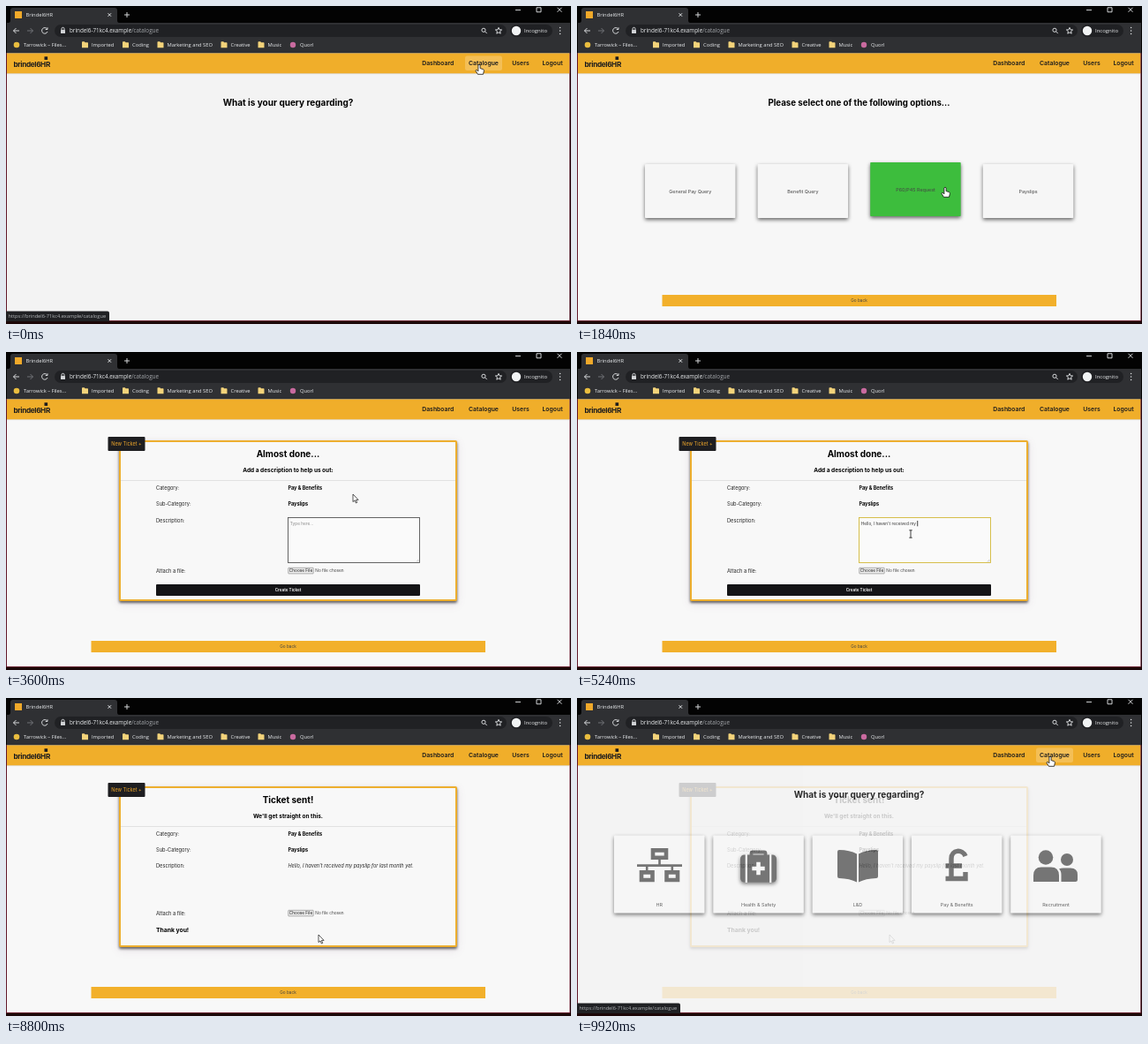
Write an HTML page that moves like this. It is 640 by 360 pixels and loops after 9.96 s.

```html
<!DOCTYPE html>
<html lang="en">
<head>
<meta charset="utf-8">
<title>Ticket walkthrough</title>
<style>
html, body { margin: 0; width: 100%; height: 100%; overflow: hidden; background: #000; }
svg { display: block; width: 100vw; height: 100vh; font-family: Inter, sans-serif; }
text { fill: #222; white-space: pre; }
.ui text { font-family: "Open Sans", "Noto Sans", sans-serif; font-size: 5.8px; fill: #eceef0; }
.ui .dim { fill: #a4a7ab; }
.line { fill: none; stroke: #e8eaed; stroke-width: .9; }
.nav text { font-size: 6.85px; font-weight: 600; fill: #1b1b1d; }
.mid { text-anchor: middle; }
.h1 { font-size: 10px; font-weight: 700; fill: #000; }
.h2 { font-size: 6.5px; font-weight: 700; fill: #000; }
.label { font-size: 5.7px; }
.value { font-size: 5.5px; font-weight: 700; fill: #000; }
.small { font-size: 4.75px; fill: #444; }
.cardText { font-size: 5.4px; fill: #444; text-anchor: middle; }
.card { fill: #f6f6f6; color: #5a5a5a; }
.card > rect { filter: drop-shadow(0 2.2px 2.2px rgba(0,0,0,.6)); }
.panel { fill: #f8f8f8; stroke: #edae2e; stroke-width: 2;
  filter: drop-shadow(0 2px 1.5px rgba(0,0,0,.6)) drop-shadow(0 2px 5px rgba(90,40,90,.12)); }

.anim, .pay, .pay > rect, .p60, .slip { animation: 9960ms linear infinite; }
#cards { animation-name: cards; }
#options { animation-name: options; }
#form { animation-name: form; }
#sent { animation-name: sent; }
#status { animation-name: status; }
#glow { animation-name: glow; }
#navHand { animation-name: navHand; }
.pay { animation-name: pay; }
.pay > rect { animation-name: payShadow; }
.p60 { animation-name: p60; }
.slip { animation-name: slip; }
#area { animation-name: focus; animation-timing-function: step-end; }
#pointer { animation-name: pointer; animation-timing-function: ease-in-out; }
#hand { animation-name: hand; animation-timing-function: step-end; }
#arrow { animation-name: arrow; animation-timing-function: step-end; }
#beam { animation-name: beam; animation-timing-function: step-end; }

@keyframes cards { 0%, .3% { opacity: 0 } 4%, 100% { opacity: 1 } }
@keyframes options { 0%, 14.46% { opacity: 0 } 17.27%, 40% { opacity: 1 } 40.01%, 100% { opacity: 0 } }
@keyframes form { 0%, 28.9% { opacity: 0 } 32.1%, 89% { opacity: 1 } 89.01%, 100% { opacity: 0 } }
@keyframes sent { 0%, 84.74% { opacity: 0 } 88.3%, 97.19% { opacity: 1 } 99.6% { opacity: .18 } 100% { opacity: 0 } }
@keyframes status { 0%, 5% { opacity: 1 } 8.6%, 97.19% { opacity: 0 } 99.6%, 100% { opacity: 1 } }
@keyframes glow { 0%, 3.6% { opacity: 1 } 4.8%, 97.19% { opacity: 0 } 99.6%, 100% { opacity: 1 } }
@keyframes navHand { 0%, 97.19% { opacity: 0 } 99.6%, 100% { opacity: 1 } }
@keyframes pay {
  0%, 6.43% { fill: #f6f6f6; color: #5a5a5a; transform: none }
  8.03%, 20% { fill: #3dbd3d; color: #111; transform: translateY(-2px) }
  20.01%, 100% { fill: #f6f6f6; color: #5a5a5a; transform: none }
}
@keyframes payShadow {
  0%, 6.43% { filter: drop-shadow(0 2.2px 2.2px rgba(0,0,0,.6)) }
  8.03%, 20% { filter: drop-shadow(0 3.2px 2.2px rgba(30,150,30,.9)) }
  20.01%, 100% { filter: drop-shadow(0 2.2px 2.2px rgba(0,0,0,.6)) }
}
@keyframes p60 {
  0%, 15.6% { fill: #f6f6f6; transform: none }
  18.1%, 24.6% { fill: #3dbd3d; transform: translateY(-2px) }
  26.6%, 100% { fill: #f6f6f6; transform: none }
}
@keyframes slip {
  0%, 25.3% { fill: #f6f6f6; transform: none }
  27.4%, 40% { fill: #3dbd3d; transform: translateY(-2px) }
  40.01%, 100% { fill: #f6f6f6; transform: none }
}
@keyframes focus { 0% { stroke: #555 } 42.97% { stroke: #d3b93a } 100% { stroke: #555 } }
@keyframes pointer {
  0%, 2.6% { transform: translate(536px, 66px) }
  7.3%, 14.46% { transform: translate(415.5px, 207px) }
  18%, 23.29% { transform: translate(417px, 205px) }
  27.1%, 29.1% { transform: translate(506px, 204px) }
  32.9%, 39.36% { transform: translate(393px, 161px) }
  43%, 73.5% { transform: translate(378px, 206px) }
  81.5%, 82.3% { transform: translate(356px, 262px) }
  84.3%, 100% { transform: translate(354px, 268px) }
}
@keyframes hand { 0% { opacity: 1 } 30.1% { opacity: 0 } 83% { opacity: 1 } 85% { opacity: 0 } 100% { opacity: 0 } }
@keyframes arrow {
  0% { opacity: 0 } 30.1% { opacity: 1 } 41.3% { opacity: 0 } 78.5% { opacity: 1 } 83% { opacity: 0 } 85% { opacity: 1 }
  97.19% { opacity: 1; animation-timing-function: linear } 99.6% { opacity: .15; animation-timing-function: linear } 100% { opacity: 0 }
}
@keyframes beam { 0% { opacity: 0 } 41.3% { opacity: 1 } 78.5% { opacity: 0 } 100% { opacity: 0 } }
</style>
</head>
<body>
<svg viewBox="0 0 640 360" preserveAspectRatio="none">
  <defs>
    <path id="handShape" d="M-1.1.9Q0-.7 1.1.9V4.6L4.4 5.6Q5.6 6 5.4 7.6L4.5 11.3H-1.6L-4 7.3Q-3.6 5.7-2.4 6.7L-1.1 7.8Z" fill="#fff" stroke="#111" stroke-width=".8"/>
    <path id="folder" d="M0 .6Q0 0 .6 0H2.8L3.6 1H6.4Q7 1 7 1.6V7H0Z" fill="#f3d37a"/>
  </defs>

  <rect width="640" height="360" fill="#030303"/>
  <rect y="356" width="640" height="4" fill="#1b0708"/>

  <!-- Browser frame -->
  <g class="ui">
    <path d="M3 19Q5 19 5 16V5Q5 2 8 2H123Q126 2 126 5V16Q126 19 128 19H639V53.5H1V19Z" fill="#2f3033"/>
    <rect x="10" y="6" width="8" height="8" fill="#f0a92a"/>
    <text x="22.5" y="12.1">Brindel6HR</text>
    <path class="line" d="M115.5 8.2l3.6 3.6m0-3.6l-3.6 3.6M134 10h6M137 7v6"/>
    <path class="line" d="M577 4.6h6M601 1.8h5v5h-5zM624.5 1.8l5 5m0-5l-5 5"/>
    <path class="line" d="M15 28H8.5m3-3l-3 3 3 3M46.6 26a3.3 3.3 0 1 0 .4 3M47 24.3v2.2h-2.3"/>
    <path class="line" d="M24 28h6.5m-3-3l3 3-3 3" style="stroke:#77797d"/>
    <rect x="55" y="21" width="512" height="14" rx="7" fill="#202124"/>
    <rect x="62" y="27" width="5" height="4" rx=".5" fill="#d0d2d5"/>
    <path class="line" d="M63 27v-1.2a1.5 1.5 0 0 1 3 0V27"/>
    <text x="72" y="30.2" style="font-size:6.3px">brindel6-71kc4.example<tspan class="dim">/catalogue</tspan></text>
    <circle class="line" cx="541" cy="27.3" r="2.1"/>
    <path class="line" d="M542.6 28.9l2.2 2.2M558 24.4l1 2.4 2.6.2-2 1.7.6 2.5-2.2-1.3-2.2 1.3.6-2.5-2-1.7 2.6-.2z"/>
    <rect x="571" y="21" width="48" height="14" rx="7" fill="#202124"/>
    <circle cx="578" cy="28" r="5.2" fill="#f1f3f4"/>
    <text x="587" y="30.1" style="font-size:6px">Incognito</text>
    <path d="M627.6 24.5v.1M627.6 28v.1M627.6 31.5v.1" stroke="#e4e6e8" stroke-width="1.5" stroke-linecap="round"/>
    <g id="bookmarks"></g>
  </g>

  <!-- Category page -->
  <rect x="1" y="53.5" width="637.5" height="302.5" fill="#f3f3f3"/>
  <text class="h1 mid" x="319.5" y="113.2">What is your query regarding?</text>
  <g id="cards" class="anim"></g>

  <g id="options" class="anim">
    <rect x="1" y="76" width="637.5" height="280" fill="#f7f7f7"/>
    <text class="h1 mid" x="319.5" y="113.2" style="font-size:9.7px">Please select one of the following options...</text>
    <g id="choices"></g>
  </g>

  <g id="form" class="anim">
    <g class="ticket"></g>
    <text class="h1 mid" x="319.5" y="118.5">Almost done...</text>
    <text class="h2 mid" x="319.5" y="136">Add a description to help us out:</text>
    <g id="formRows"></g>
    <rect id="area" class="anim" x="319.5" y="187.5" width="149" height="51" fill="#fafafa" stroke="#555" stroke-width=".9"/>
    <path d="M464.8 237.5l2.7-2.7m-1.2 2.7l1.2-1.2" stroke="#888" stroke-width=".4"/>
    <text id="typed" class="small" x="321.8" y="196"></text>
    <path id="caret" d="M0 191v6.3" stroke="#111" stroke-width=".8"/>
    <rect x="170" y="263" width="299" height="13" rx="1" fill="#141416"/>
    <text class="mid" x="319.5" y="271.2" style="font-size:4.6px;font-weight:600;fill:#fff">Create Ticket</text>
  </g>

  <g id="sent" class="anim">
    <g class="ticket"></g>
    <text class="h1 mid" x="319.5" y="118.5">Ticket sent!</text>
    <text class="h2 mid" x="319.5" y="136">We'll get straight on this.</text>
    <g id="sentRows"></g>
    <text x="319.5" y="191.9" font-style="italic" font-size="5.55">Hello, I haven't received my payslip for last month yet.</text>
    <text class="h2" x="170" y="264.8" style="font-size:6.8px">Thank you!</text>
  </g>

  <!-- Site header -->
  <g class="nav">
    <rect x="1" y="53.5" width="637.5" height="22.8" fill="#f0ae2a"/>
    <path d="M1 76.7h637.5" stroke="#000" stroke-opacity=".12" stroke-width=".8"/>
    <rect id="glow" class="anim" x="520" y="56.5" width="42" height="16.5" rx="2.5" fill="#f4bf56"/>
    <text x="8.5" y="68.6" style="font-size:8.2px;font-weight:700;letter-spacing:-.35px">brindel6HR</text>
    <rect x="43.5" y="57.3" width="3.6" height="3.6" fill="#1b1b1d"/>
    <g class="mid">
      <text x="489.3" y="66.7">Dashboard</text>
      <text x="541" y="66.7">Catalogue</text>
      <text x="583" y="66.7">Users</text>
      <text x="619" y="66.7">Logout</text>
    </g>
  </g>
  <path d="M.5 53V356.4H638.9V53" fill="none" stroke="#7c1f35" stroke-width=".8"/>

  <g id="status" class="anim ui">
    <path d="M0 345.5H115Q117 345.5 117 347.5V357H0Z" fill="#202124"/>
    <text x="2.5" y="353.2" style="font-size:5.7px;fill:#b4b7ba">https://brindel6-71kc4.example/catalogue</text>
  </g>

  <g id="navHand" class="anim"><use href="#handShape" x="536" y="66"/></g>
  <g id="pointer" class="anim">
    <use id="hand" class="anim" href="#handShape"/>
    <path id="arrow" class="anim" d="M0 0V8.6L2 6.9 3.4 10 4.7 9.4 3.4 6.4H6.1Z" fill="#fff" stroke="#111" stroke-width=".7"/>
    <path id="beam" class="anim" d="M-1.7-4.2H1.7M0-4.2V4.2M-1.7 4.2H1.7" stroke="#111" stroke-width=".8"/>
  </g>
</svg>
<script>
const LOOP = 9960;
const $ = id => document.getElementById(id);

const icons = {
  tree: `<path d="M86 172.4h15v8.4H86zM73 197.4h12.500v8.600H73zM101.500 197.400h12.500v8.600h-12.500z" fill="none" stroke="currentColor" stroke-width="4.600"/>
    <path d="M68 189.600h51M93.500 182v8M79.200 190v6M107.800 190v6" stroke="currentColor" stroke-width="2.600"/>`,
  kit: `<rect x="185" y="177.500" width="41" height="31" rx="4.500" fill="currentColor"/>
    <path d="M197.500 179v-3q0-1.500 1.500-1.500h13q1.500 0 1.500 1.500v3" fill="none" stroke="currentColor" stroke-width="3.800"/>
    <path d="M191.800 177v32M219.200 177v32" stroke="#f6f6f6" stroke-width="2.200"/>
    <path d="M198.300 193h14.400M205.500 185.800v14.400" stroke="#f6f6f6" stroke-width="4.600"/>`,
  book: `<path d="M317 176.500Q309 172 297 172Q295 172 295 174V202Q295 204 297 204.100Q309 204.500 317 208.500ZM319 176.500Q327 172 339 172Q341 172 341 174V202Q341 204 339 204.100Q327 204.500 319 208.500Z" fill="currentColor"/>`,
  pound: `<path d="M440 179C437 171 424 171 424 182V204M417.500 190H436M417.500 204.500H440V197" fill="none" stroke="currentColor" stroke-width="5.400"/>`,
  people: `<circle cx="531" cy="180.500" r="8.300" fill="currentColor"/><circle cx="555" cy="183" r="7" fill="currentColor"/>
    <path d="M517 208V201Q517 191.500 526 191.500H537Q546 191.500 546 201V208ZM548.500 208V200Q548.500 195.500 546 193.500Q548 192.500 551 192.500H559Q567 192.500 567 200V205.500Q567 208 564.500 208Z" fill="currentColor"/>`
};

const card = (x, y, h, textY, name, cls = '', icon = '') =>
  `<g class="card ${cls}"><rect x="${x}" y="${y}" width="102.5" height="${h}" rx=".8"/>${icon}
   <text class="cardText" x="${x + 51.3}" y="${textY}">${name}</text></g>`;

$('cards').innerHTML = [
  ['HR', 'tree'], ['Health &amp; Safety', 'kit'], ['L&amp;D', 'book'],
  ['Pay &amp; Benefits', 'pound', 'pay'], ['Recruitment', 'people']
].map(([name, icon, cls], i) => card(42 + i * 112.3, 155.5, 88, 236.3, name, cls, icons[icon])).join('');

const goBack = `<rect x="96.5" y="327" width="446.5" height="13" fill="#f2b02b"/>
  <text class="small mid" x="319.5" y="335.3">Go back</text>`;

$('choices').innerHTML = [
  ['General Pay Query'], ['Benefit Query'], ['P60/P45 Request', 'p60'], ['Payslips', 'slip']
].map(([name, cls], i) => card(77 + i * 127.6, 179, 61, 211.6, name, cls)).join('') + goBack;

document.querySelectorAll('.ticket').forEach(g => g.innerHTML =
  `<rect x="1" y="76" width="637.5" height="280" fill="#f8f8f8"/>
   <rect class="panel" x="129" y="101" width="381" height="180" rx=".8"/>
   <path d="M130 145.5H509" stroke="#ddd" stroke-width=".8"/>
   <rect x="115.5" y="96" width="42" height="16" rx="1" fill="#1e1e21"/>
   <text class="mid" x="136.5" y="105.7" style="font-size:5.5px;fill:#f2a92b">New Ticket +</text>` + goBack);

// Label baselines, plus the file picker aligned with the last one
const rows = ys => ['Category:', 'Sub-Category:', 'Description:', 'Attach a file:']
  .map((s, i) => `<text class="label" x="170" y="${ys[i]}">${s}</text>`).join('') +
  `<text class="value" x="319.5" y="${ys[0]}">Pay &amp; Benefits</text>
   <text class="value" x="319.5" y="${ys[1]}">Payslips</text>
   <rect x="319.8" y="${ys[3] - 5.3}" width="28.4" height="6.6" rx=".6" fill="#efefef" stroke="#777" stroke-width=".6"/>
   <text class="small mid" x="334" y="${ys[3] - .3}" style="fill:#111">Choose File</text>
   <text class="small" x="350.3" y="${ys[3] - .3}">No file chosen</text>`;
$('formRows').innerHTML = rows([155.5, 174, 193.2, 249.6]);
$('sentRows').innerHTML = rows([155.5, 173.6, 191.9, 245.6]);

$('bookmarks').innerHTML =
  '<circle cx="12" cy="44" r="3.3" fill="#e9bd3f"/><text x="20" y="46.1">Tarrowick – Files...</text>' +
  [[86, 'Imported'], [132, 'Coding'], [171.5, 'Marketing and SEO'], [243.5, 'Creative'], [285.5, 'Music']]
    .map(([x, s]) => `<use href="#folder" x="${x}" y="40.3"/><text x="${x + 11}" y="46.1">${s}</text>`).join('') +
  '<circle cx="325" cy="44" r="3.2" fill="#c96a9f"/><text x="333" y="46.1">Quorl</text>';

const message = "Hello, I haven't received my payslip for last month yet";
const start = performance.now();

function type() {
  const t = (performance.now() - start) % LOOP;
  const part = Math.min(1, Math.max(0, (t - 4490) / 1470));
  const count = Math.ceil(part * message.length);
  const text = message.slice(0, count) + (t >= 7200 ? '.' : '');
  const typed = $('typed');
  const shown = text || 'Type here...';
  if (typed.textContent !== shown) typed.textContent = shown;
  typed.style.fill = text ? '#333' : '#8a8a8a';

  const blinkOff = (t >= 6400 && t < 6920) || (t >= 7720 && t < 8240);
  const width = text ? typed.getComputedTextLength() : 0;
  $('caret').setAttribute('transform', `translate(${322.3 + width} 0)`);
  $('caret').style.opacity = t >= 4280 && t < 8400 && !blinkOff ? 1 : 0;
  requestAnimationFrame(type);
}
type();
</script>
</body>
</html>
```
